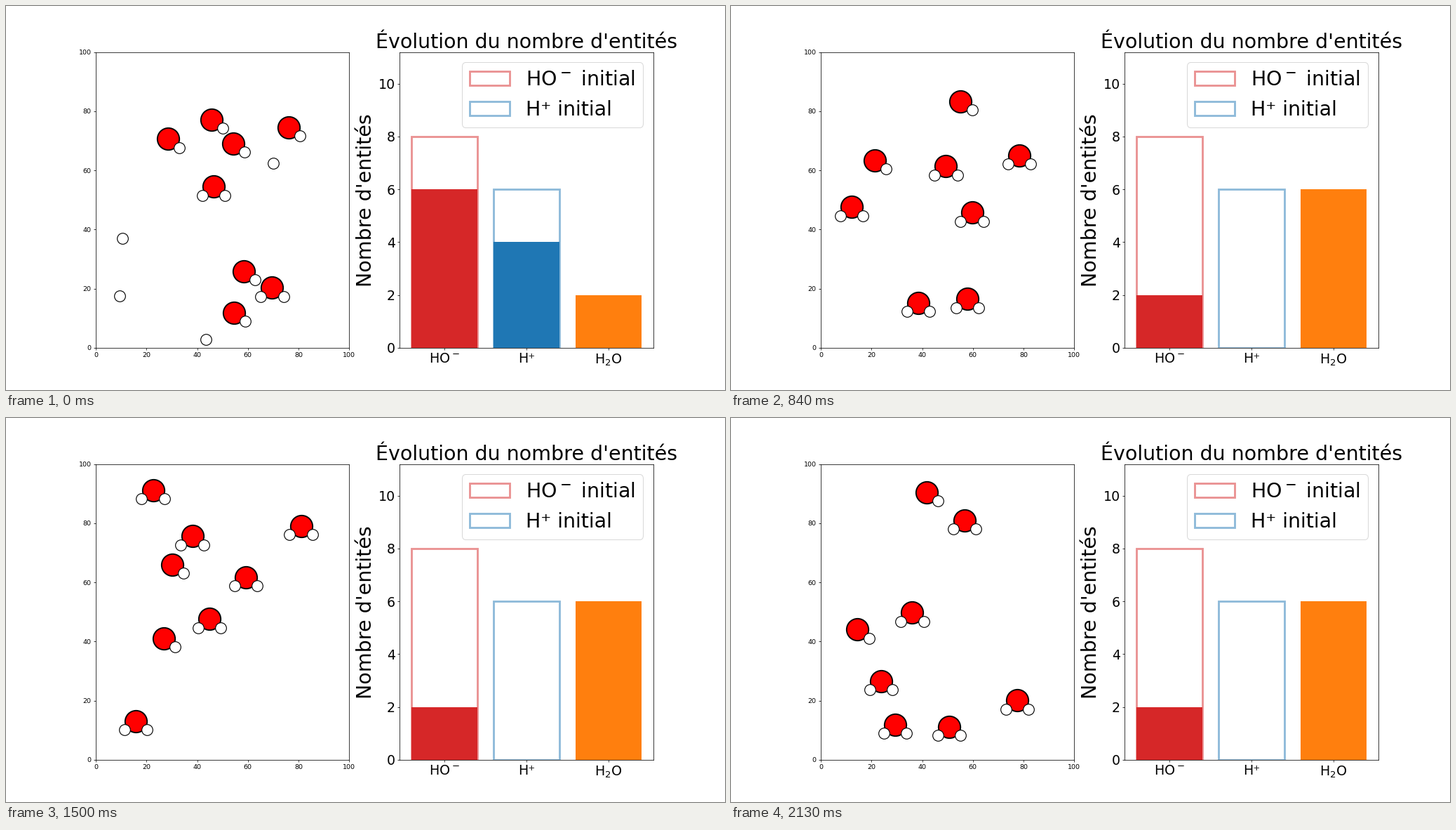
These frames come from a looping animation (1025 px wide and 547 px high, 2160 ms). A matplotlib script:

```python
import numpy as np
import matplotlib.pyplot as plt
from matplotlib.animation import FuncAnimation

W, H, DPI = 1025, 547, 547 / 8
FRAMES, CYCLE, STEP = 72, 36, 30
KEYS = [0, 5, 14, 21, 28, 35]
RIGHT, LEFT = np.array([4.5, -3.0]), np.array([-4.5, -3.0])

# Oxygen way-points at KEYS, and the step from which each one is water
TRACKS = [
    ([28.4, 22.6, 22.6, 6.6, 12.1, 23.8], [70.6, 37.0, 91.2, 72.7, 47.6, 26.6], 4),
    ([45.6, 55.6, 30.1, 89.4, 55.2, 41.7], [77.2, 54.5, 66.0, 88.1, 83.4, 90.5], CYCLE),
    ([54.2, 69.5, 59.2, 76.2, 57.8, 50.6], [69.1, 67.9, 61.8, 18.1, 16.5, 11.2], 13),
    ([76.1, 84.7, 81.0, 59.2, 78.3, 77.5], [74.6, 88.6, 79.1, 61.3, 65.1, 20.1], 11),
    ([58.3, 54.2, 26.7, 35.6, 21.3, 14.5], [25.9, 35.9, 41.1, 93.3, 63.4, 44.1], CYCLE),
    ([54.5, 35.2, 15.7, 28.9, 59.7, 36.1], [11.9, 18.3, 13.1, 45.7, 45.8, 49.8], 3),
    ([46.5, 22.6 + 54.4, 38.1, 40.9, 49.4, 56.7], [54.5, 28.2, 75.6, 58.4, 61.4, 81.0], 0),
    ([69.6, 77.4, 44.8, 58.3, 38.5, 29.3], [20.4, 16.0, 47.7, 22.1, 15.2, 11.9], 0),
]

# Free protons: way-points at KEYS, then the oxygen they bind to
PROTONS = [
    ([(10.4, 36.9)], 0),
    ([(43.4, 2.9)], 5),
    ([(70.0, 62.5), (39.3, 82.4)], 3),
    ([(9.4, 17.5), (27.0, 29.2)], 2),
]


def oxygen(i, n):
    xs, ys, _ = TRACKS[i]
    return np.array([np.interp(n, KEYS, xs), np.interp(n, KEYS, ys)])


def proton(points, host, n):
    join = TRACKS[host][2]
    times = KEYS[:len(points)] + [join]
    path = np.array(points + [tuple(oxygen(host, join) + LEFT)])
    return [np.interp(n, times, path[:, k]) for k in (0, 1)]


fig, (box, chart) = plt.subplots(1, 2, figsize=(W / DPI + 1e-9, H / DPI), dpi=DPI)

box.set(xlim=(0, 100), ylim=(0, 100))
oxy, = box.plot([], [], "o", ms=33, mfc="red", mec="black", mew=2)
hyd, = box.plot([], [], "o", ms=16.5, mfc="white", mec="black", mew=1.2)

names = ["HO$^-$", "H⁺", "H$_2$O"]
colors = ["tab:red", "tab:blue", "tab:orange"]
for i, start in enumerate([8, 6]):
    chart.bar(i, start, fill=False, edgecolor=colors[i], alpha=0.5, lw=3,
              label=names[i] + " initial")
bars = chart.bar(range(3), [0, 0, 0], color=colors)
chart.set(xlim=(-0.54, 2.54), ylim=(0, 11.2))
chart.set_xticks(range(3), names)
chart.tick_params(labelsize=20)
chart.set_ylabel("Nombre d'entités", fontsize=30)
chart.set_title("Évolution du nombre d'entités", fontsize=30)
chart.legend(fontsize=30, loc="upper right")


def draw(frame):
    n = frame % CYCLE
    centers = np.array([oxygen(i, n) for i in range(len(TRACKS))])
    water = np.array([n >= t[2] for t in TRACKS])
    free = [proton(p, host, n) for p, host in PROTONS if not water[host]]
    parts = [centers + RIGHT, centers[water] + LEFT]
    if free:
        parts.append(np.array(free))
    oxy.set_data(*centers.T)
    hyd.set_data(*np.vstack(parts).T)
    made = water.sum()
    for bar, count in zip(bars, (8 - made, 6 - made, made)):
        bar.set_height(count)
    return oxy, hyd, *bars


anim = FuncAnimation(fig, draw, frames=FRAMES, interval=STEP, repeat=True,
                     repeat_delay=0, blit=False)
plt.show()
```
